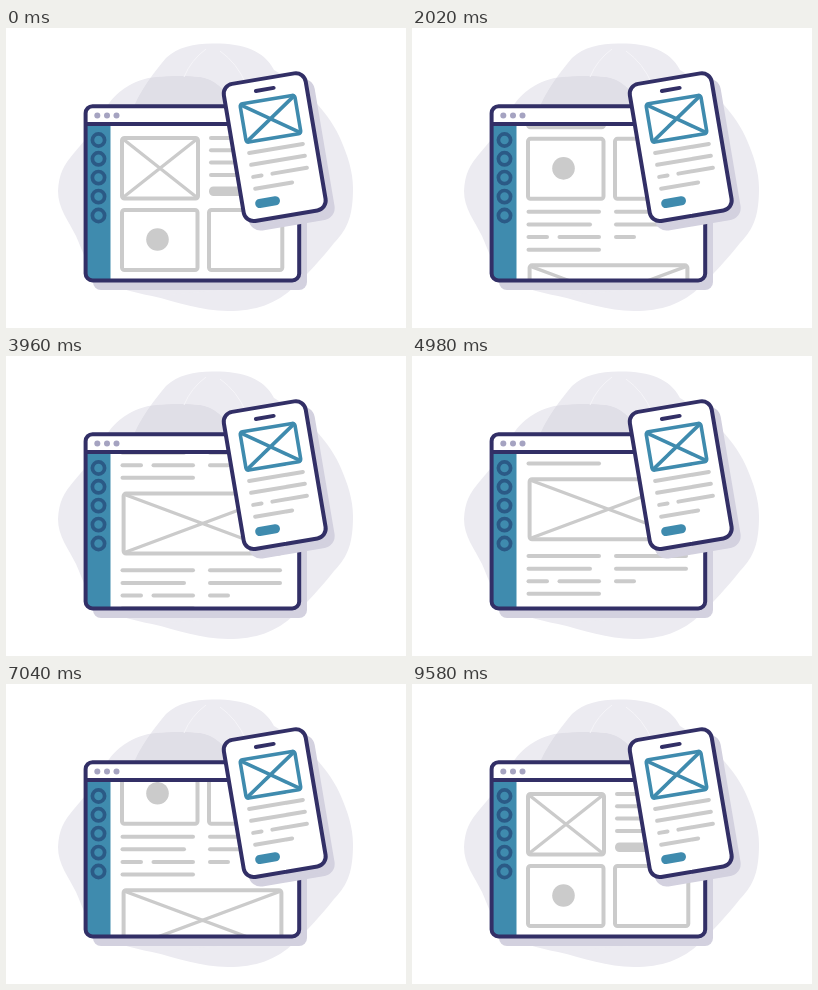
An HTML page for the animation above (9600 ms loop, 400 px wide and 300 px high).

```html
<!DOCTYPE html>
<html lang="en">
<head>
<meta charset="utf-8">
<title>Wireframe scroll</title>
<style>
  html, body { margin: 0; width: 100%; height: 100%; overflow: hidden; background: #fff; }
  svg { display: block; width: 100%; height: 100%; }
  .ink { stroke: #322f66; stroke-width: 4; }
  .grey { fill: none; stroke: #cbcbcb; stroke-width: 4; stroke-linecap: round; stroke-linejoin: round; }
  .thin { stroke-width: 3.3; }
  .blue { fill: none; stroke: #3f8bae; stroke-width: 3.6; stroke-linecap: round; stroke-linejoin: round; }
  .wisp { fill: none; stroke: #f6f5f9; stroke-width: 1; }
</style>
</head>
<body>
<svg viewBox="0 0 400 300" fill="none">
  <defs>
    <clipPath id="view"><rect x="106" y="98" width="185" height="153"/></clipPath>
    <clipPath id="body"><rect x="79.6" y="78.2" width="213.6" height="174.3" rx="7"/></clipPath>
    <path id="back" d="M206 15.5C236 15 258 22 268 42C290 55 320 78 334 110C342 128 347 144 347 160C347 185 343 200 328 215C316 230 302 246 288 259C270 276 250 283 222 283C195 283 172 274 146 268L120 150C124 110 124 95 129 76C135 62 148 44 160 30C172 19 188 15.5 206 15.5Z"/>
    <path id="front" d="M100 80C108 66 126 51 150 49C165 47.5 182 47.5 194 49C208 51 220 61 230 80L240 260L146 268C126 264 100 258 90 247C80 235 77 224 70 208C62 192 52 180 52 163C53 146 57 138 68 125L79 112Z"/>
    <clipPath id="overlap"><use href="#back"/></clipPath>
  </defs>

  <g fill="#ecebf1"><use href="#back"/><use href="#front"/></g>
  <g clip-path="url(#overlap)"><use href="#front" fill="#e0dfe7" clip-path="url(#top)"/></g>
  <clipPath id="top"><rect width="400" height="100"/></clipPath>
  <path class="wisp" d="M200 21Q185 32 178 49M214 23Q231 35 240 56"/>

  <rect x="87" y="86" width="214" height="176" rx="8" fill="#d3d1df"/>
  <g clip-path="url(#body)">
    <rect x="78" y="78" width="216" height="175" fill="#fff"/>
    <rect x="78" y="96" width="26.5" height="157" fill="#3f8bae"/>
  </g>
  <g id="rings" stroke="#2b5a86" stroke-width="3.7"></g>
  <g id="dots" fill="#a5a3c1"></g>
  <g clip-path="url(#view)"><g id="page"></g></g>
  <path class="ink" d="M80 96H293"/>
  <rect class="ink" x="79.6" y="78.2" width="213.6" height="174.3" rx="7"/>

  <g id="phone"></g>
</svg>
<script>
const LOOP = 9600, REACH = 186;
const $ = id => document.getElementById(id);

const line = (x1, x2, y) => `<path class="grey" d="M${x1} ${y}H${x2}"/>`;
const box = (x, y, w, h, cls = 'grey') =>
  `<rect class="${cls}" x="${x}" y="${y}" width="${w}" height="${h}" rx="2.5"/>`;
const cross = (x, y, w, h, cls) =>
  `<path class="${cls}" d="M${x} ${y}m1 1l${w - 2} ${h - 2}M${x + w} ${y}m-1 1l${2 - w} ${h - 2}"/>`;
const picture = (x, y, w, h, cls, thin = '') =>
  box(x, y, w, h, cls) + cross(x, y, w, h, `${cls} ${thin}`);

// Two columns of placeholder copy
const copy = y =>
  line(116.5, 187, y) + line(116.5, 178, y + 12.6) +
  line(116.5, 135, y + 25.2) + line(147.5, 187, y + 25.2) + line(116.5, 187, y + 37.8) +
  line(204, 274, y) + line(204, 274, y + 12.6) + line(204, 222, y + 25.2);

$('page').innerHTML =
  picture(116, 110, 76, 60.5, 'grey', 'thin') +
  [110, 122.3, 134.6, 147].map(y => line(205, 274, y)).join('') +
  '<rect x="203" y="158.5" width="38" height="9.5" rx="4.5" fill="#cbcbcb"/>' +
  box(116, 182, 75.5, 60) + '<circle cx="151.5" cy="211.5" r="11.3" fill="#cbcbcb"/>' +
  box(203, 182, 73.3, 60) +
  copy(255) +
  picture(117.6, 308.5, 157.8, 60, 'grey', 'thin') +
  copy(385.3);

$('rings').innerHTML = [112, 130.8, 149.6, 168.6, 187.5]
  .map(y => `<circle cx="92.5" cy="${y}" r="6.1"/>`).join('');
$('dots').innerHTML = [91.3, 101, 110.5]
  .map(x => `<circle cx="${x}" cy="87.6" r="3"/>`).join('');

const shell = '<rect x="-41.8" y="-69.4" width="83" height="139" rx="10"';
$('phone').innerHTML =
  `<g transform="translate(276 126.5) rotate(-9.6)">${shell} fill="#d3d1df" stroke="#d3d1df" stroke-width="4"/></g>` +
  `<g transform="translate(269 119) rotate(-9.6)">${shell} class="ink" fill="#fff"/>` +
  '<path class="ink" stroke-linecap="round" d="M-9.5 -58.5H8.5"/>' +
  picture(-27.5, -48, 55.5, 38.8, 'blue') +
  line(-26.5, 28, 1.6) + line(-26.5, 28, 13.6) +
  line(-26.5, -18, 25.8) + line(-7, 28, 25.8) + line(-26.5, 11, 37.8) +
  '<rect x="-29" y="48.5" width="25" height="9.2" rx="4.5" fill="#3f8bae"/></g>';

function draw(ms) {
  const p = (ms % LOOP) / LOOP;
  const u = 1 - Math.abs(2 * p - 1);
  const scroll = REACH * u * u * (3 - 2 * u);
  $('page').setAttribute('transform', `translate(0 ${-scroll.toFixed(3)})`);
}

const start = performance.now();
function tick() {
  draw(performance.now() - start);
  requestAnimationFrame(tick);
}
tick();
</script>
</body>
</html>
```
